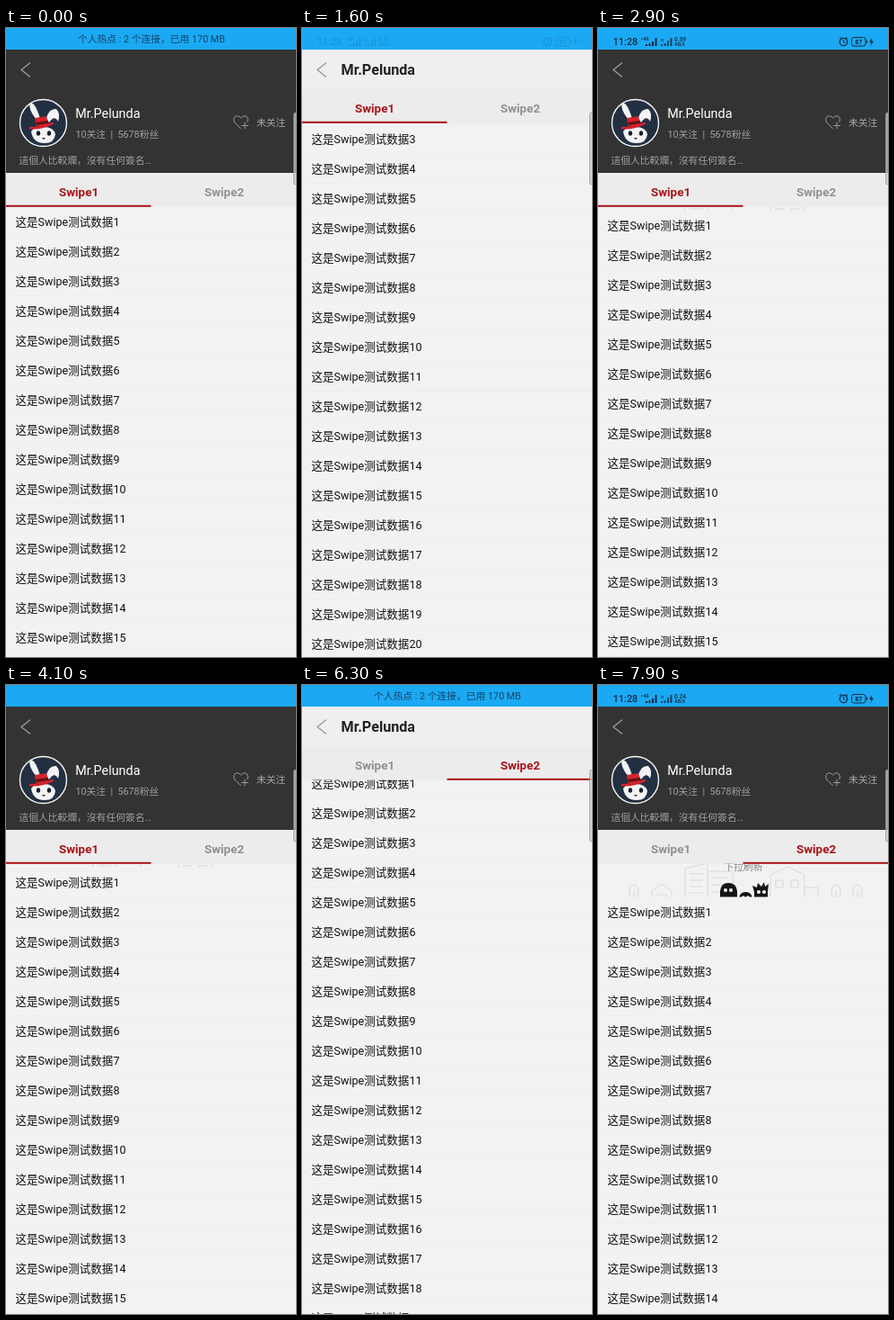
Recreate the animation shown at these times as an HTML page. Size 323 by 699 pixels, loop 8 s.

```html
<!DOCTYPE html>
<html lang="zh-CN">
<head>
<meta charset="utf-8">
<style>
html, body { margin: 0; width: 100%; height: 100%; overflow: hidden; background: #f2f2f2; }
svg { display: block; width: 100vw; height: 100vh; }
text { font-family: Roboto, "Noto Sans CJK SC", "Noto Sans CJK", sans-serif; font-size: 10.77px; white-space: pre; }
.row { font-size: 12.56px; fill: #111; }
.tab { font-size: 13.45px; font-weight: 700; text-anchor: middle; }
.dim { fill: #a0a0a0; }
.line { fill: none; stroke: #9a9a9a; stroke-linecap: round; stroke-linejoin: round; }
.town { fill: none; stroke: #d9d9d9; }
</style>
</head>
<body>
<svg viewBox="0 0 323 699">
  <rect width="323" height="699" fill="#f2f2f2"/>

  <g id="refresh">
    <g class="town">
      <path d="M0 36H323M97 36V-13L122 -19V36M122 -10H150V36M102 -7H117M102 0H117M102 7H117M102 14H117M127 -3H145M127 5H145M127 13H145"/>
      <path d="M192 36V-6L211 -15L230 -6V36M198 0H206V8H198ZM215 0H223V8H215ZM230 8H245V36M60 36V12L71 4L82 12V36M66 16H76V23H66Z"/>
      <path d="M40 36V11M265 36V11M289 36V11"/>
      <ellipse cx="40" cy="13" rx="5" ry="8"/>
      <ellipse cx="265" cy="13" rx="5" ry="8"/>
      <ellipse cx="289" cy="13" rx="5" ry="8"/>
    </g>
    <text x="162" y="-11" text-anchor="middle" fill="#8a8a8a">下拉刷新</text>
    <g fill="#151515">
      <path d="M136 36V12Q137 3 145 3Q154 3 155 12V36Z"/>
      <path d="M157 36V20Q158 13 164.500 13Q171 13 172 20V36Z"/>
      <path d="M174 36V13L172 6L177 8L178 3L182 7L185 2L186 7L190 4L189 13V36Z"/>
    </g>
    <g fill="#fff">
      <circle cx="142" cy="11" r="2"/><circle cx="148" cy="11" r="2"/>
      <circle cx="162" cy="19" r="1.700"/><circle cx="167" cy="19" r="1.700"/>
      <circle cx="179" cy="13" r="2"/><circle cx="185" cy="13" r="2"/>
    </g>
  </g>

  <g id="list">
    <rect y="198.500" width="323" height="860" fill="#f2f2f2"/>
    <g id="pages"></g>
  </g>

  <g id="header">
    <rect y="20" width="323" height="141" fill="#333"/>
    <g id="profile">
      <circle cx="41.500" cy="105.500" r="26" fill="#223042" stroke="#f4f4f4" stroke-width="1.400"/>
      <g fill="#f3f3f3">
        <path d="M34 102Q24 90 27 83Q33 83 38 101Z"/>
        <path d="M45 100Q48 89 56 90Q61 95 58 104Q54 96 48 105Z"/>
        <path d="M28 115Q32 109 42 110Q53 110 55 118Q54 128 43 128Q30 128 28 115Z"/>
      </g>
      <path d="M32 100L45 98L47 108L34 110Z" fill="#d3222b"/>
      <path d="M33.500 105L46.500 103L47 106L34 108Z" fill="#5c1318"/>
      <path d="M27 111Q38 112 52 106" fill="none" stroke="#d3222b" stroke-width="2.600" stroke-linecap="round"/>
      <ellipse cx="36" cy="117" rx="2.200" ry="2.800" fill="#18212d"/>
      <ellipse cx="48" cy="117" rx="2.200" ry="2.800" fill="#18212d"/>
      <path d="M40 122H44L42 124Z" fill="#18212d"/>
      <text x="77.300" y="99.500" style="font-size:14.360px" fill="#fff">Mr.Pelunda</text>
      <text class="dim" x="77.500" y="121.800">10关注  |  5678粉丝</text>
      <text class="dim" x="14.500" y="150.500">這個人比較爛，沒有任何簽名…</text>
      <path class="line" d="M261.500 111.500L255.500 106Q252 101.500 255 98.700Q258.500 96.300 261.700 100Q265 96.300 268.300 98.700Q270.500 101 269 104.500M266 105V112M262.500 108.500H269.500"/>
      <text x="279" y="109" fill="#a8a8a8">未关注</text>
    </g>
    <rect id="scrim" y="20" width="323" height="141" fill="#efefef"/>
    <rect y="161" width="323" height="37.500" fill="#ececec"/>
    <text class="tab" id="tab1" x="81" y="187.300">Swipe1</text>
    <text class="tab" id="tab2" x="243" y="187.300">Swipe2</text>
    <rect id="mark" y="196.800" width="161.500" height="2" fill="#a81419"/>
  </g>

  <path class="line" d="M26.500 39L17 46.500L26.500 54" stroke-width="1.500"/>
  <text id="title" x="43.500" y="52" style="font-size:16.150px;font-weight:700" fill="#222">Mr.Pelunda</text>
  <rect x="320.500" y="94" width="8" height="80" rx="2.500" fill="#c9c9c9" fill-opacity=".75" stroke="#999" stroke-width=".8"/>

  <rect width="323" height="24" fill="#1ba9f4"/>
  <text id="hotspot" x="162" y="16" text-anchor="middle" fill="#174463">个人热点 : 2 个连接，已用 170 MB</text>
  <g id="clock" fill="#10293d">
    <text x="16.800" y="19.300" font-weight="500">11:28</text>
    <text x="48" y="13.500" style="font-size:4.500px;font-weight:700">⁸ 4G</text>
    <path d="M53 20V18H55V20ZM56.500 20V17H58.500V20ZM60 20V15H62V20ZM63.500 20V11H65.500V20Z"/>
    <path d="M70 12L73 15M73 12L70 15" stroke="#10293d" stroke-width=".8"/>
    <path d="M70 20V18H72V20ZM73.500 20V17H75.500V20ZM77 20V14H79V20ZM80.500 20V11H82.500V20Z" fill-opacity=".8"/>
    <text id="speed" x="85" y="14.500" style="font-size:6.500px;font-weight:500"></text>
    <text x="85.500" y="20" style="font-size:5px;font-weight:500">KB/S</text>
    <g fill="none" stroke="#10293d">
      <circle cx="273.500" cy="15.500" r="4.200" stroke-width="1.300"/>
      <path d="M273.500 13V16H275.500M269 12L271 10M278 12L276 10"/>
      <rect x="282.500" y="10.500" width="15.500" height="9.500" rx="2.500"/>
      <path d="M299.500 13.500V17"/>
    </g>
    <text x="290.200" y="18" text-anchor="middle" style="font-size:7px;font-weight:700">87</text>
    <path d="M305.500 10.500L302 16H304.300L303.300 20L307 14.500H304.700Z"/>
  </g>
</svg>
<script>
const LOOP = 8000, STEP = 100, WIDTH = 323, ROW = 33, COLLAPSE = 93;
const $ = id => document.getElementById(id);

// Each track alternates time and value.
const tracks = {
  scroll: [800, 0, 900, 14, 1200, 85, 1500, 152, 1600, 158, 1900, 158, 2000, 146, 2400, 40, 2700, 0,
           5500, 0, 5600, 10, 6000, 62, 6300, 106, 6400, 106, 6500, 135, 6600, 150,
           6700, 150, 6800, 138, 7200, 45, 7500, 0],
  pull: [2800, 0, 2900, 4.5, 3000, 38, 3100, 38, 3200, 52, 3500, 74, 3700, 74, 4000, 15,
         4100, 4.5, 4300, 4.5, 4400, 0, 7600, 0, 7700, 14, 7800, 14, 7900, 37],
  swipe: [4700, 0, 4800, 173, 5000, 247, 5200, 247, 5300, 323],
  hotspot: [1300, 1, 1400, 0, 4300, 0, 4400, .3, 4600, 1, 6400, 1, 6500, .5, 6600, 0],
  clock: [1500, 0, 1600, .15, 1700, .15, 1800, 1, 3800, 1, 4000, 0, 6700, 0, 6800, .3, 7000, 1]
};

function sample(track, t) {
  if (t <= track[0]) return track[1];
  for (let i = 2; i < track.length; i += 2) {
    if (t <= track[i]) {
      const k = (t - track[i - 2]) / (track[i] - track[i - 2]);
      return track[i - 1] + (track[i + 1] - track[i - 1]) * k;
    }
  }
  return track[track.length - 1];
}

function pageRows(x) {
  return Array.from({ length: 24 }, (_, i) => {
    const y = 198.5 + i * ROW;
    return `<text class="row" x="${x + 10.5}" y="${y + 21}">这是Swipe测试数据${i + 1}</text>
      <path d="M${x} ${y + ROW}h${WIDTH}" stroke="#eee"/>`;
  }).join("");
}

const move = (id, x, y) => $(id).setAttribute("transform", `translate(${x} ${y})`);
const fade = (id, v) => $(id).setAttribute("opacity", v);

function render(ms) {
  const t = Math.floor(ms % LOOP / STEP) * STEP;
  const s = {};
  for (const name in tracks) s[name] = sample(tracks[name], t);

  const shift = Math.min(s.scroll, COLLAPSE), folded = shift / COLLAPSE;
  move("header", 0, -shift);
  fade("profile", 1 - folded);
  fade("scrim", folded);
  fade("title", Math.max(0, folded * 2 - 1));

  move("list", 0, s.pull - s.scroll);
  move("pages", -s.swipe, 0);
  move("refresh", 0, 198.5 + s.pull / 2);
  fade("refresh", s.pull > 0 ? 1 : 0);

  const second = s.swipe > WIDTH / 2;
  $("tab1").setAttribute("fill", second ? "#909090" : "#a81419");
  $("tab2").setAttribute("fill", second ? "#a81419" : "#909090");
  $("mark").setAttribute("x", s.swipe / 2);

  fade("hotspot", s.hotspot);
  fade("clock", s.clock);
  $("speed").textContent = t < 5000 ? "0.39" : "0.24";
}

$("pages").innerHTML = pageRows(0) + pageRows(WIDTH);
const start = performance.now();
function tick() {
  render(performance.now() - start);
  requestAnimationFrame(tick);
}
tick();
</script>
</body>
</html>
```
